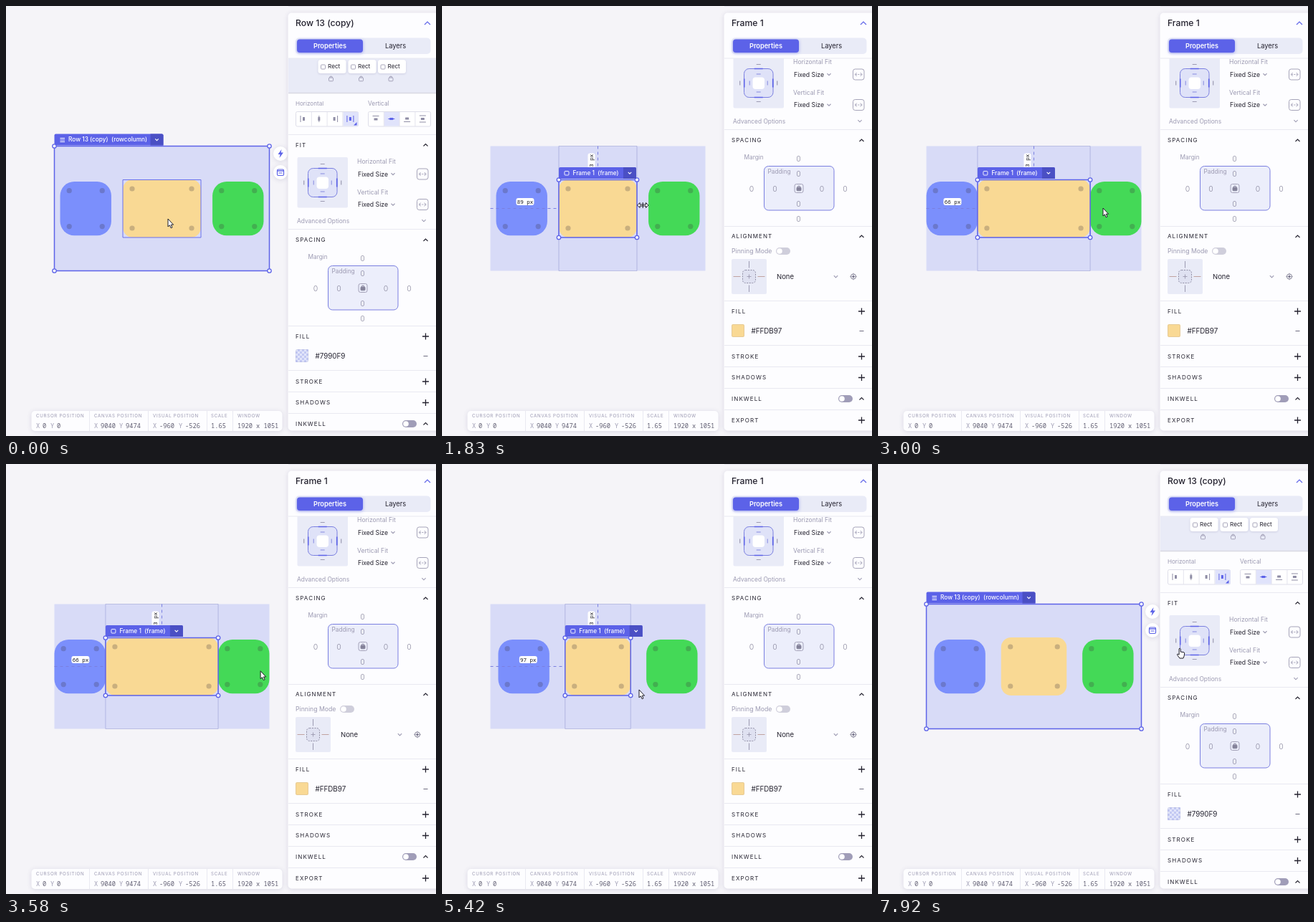
Animation of 600 by 600 pixels, one loop 8 s. Source, as an HTML page with a canvas:

```html
<!DOCTYPE html>
<html lang="en">
<head>
<meta charset="utf-8">
<title>Row layout editor</title>
<style>
html, body { margin: 0; width: 100%; height: 100%; overflow: hidden; background: #f5f4f8; }
canvas { display: block; width: 600px; height: 600px; }
</style>
</head>
<body>
<canvas id="stage" width="600" height="600"></canvas>
<script>
const ctx = document.getElementById('stage').getContext('2d');
const LOOP = 8000, STEP = 1000 / 12;
const SANS = 'Inter, "Open Sans", sans-serif', MONO = '"Noto Sans Mono", "DejaVu Sans Mono", monospace';
const ACCENT = '#5c62e8', SOFT = '#7a7fe0', INK = '#24222f', MUTED = '#9c9ab2', LINE = '#e9e9f1', PALE = '#e9ebf7';
const ROW = { x: 67.5, y: 195.5, w: 300, h: 174 };

const CURSOR = [
  [0, 226, 297], [250, 226, 297], [750, 263, 296], [917, 263, 296], [1170, 280, 278],
  [1833, 280, 278], [2500, 297, 281], [3000, 314, 282], [3333, 366, 290], [3500, 366, 290],
  [4250, 268, 279], [4500, 253, 283], [4667, 253, 283], [5417, 275, 315], [5583, 284, 322],
  [5750, 288.5, 326], [6000, 289, 345], [7333, 289, 345], [7917, 421, 257]
];
const WIDTH = [
  [1833, 109], [2500, 146], [2917, 157.2], [3917, 157.2], [4167, 142], [4250, 122.5],
  [4500, 82], [4667, 82], [5417, 91.5]
];

// Linear interpolation through [time, ...values] keys.
function track(keys, t) {
  const last = keys[keys.length - 1];
  if (t <= keys[0][0]) return keys[0].slice(1);
  if (t >= last[0]) return last.slice(1);
  const i = keys.findIndex(k => k[0] > t), a = keys[i - 1], b = keys[i];
  const u = (t - a[0]) / (b[0] - a[0]);
  return a.slice(1).map((v, j) => v + (b[j + 1] - v) * u);
}

function box(x, y, w, h, r, fill, stroke, lw = 1) {
  ctx.beginPath();
  ctx.roundRect(x, y, w, h, r);
  if (fill) { ctx.fillStyle = fill; ctx.fill(); }
  if (stroke) { ctx.strokeStyle = stroke; ctx.lineWidth = lw; ctx.stroke(); }
}
function dot(x, y, r, fill, stroke, lw = 1) {
  box(x - r, y - r, 2 * r, 2 * r, r, fill, stroke, lw);
}
function path(points, stroke, lw = 1, dash = []) {
  ctx.beginPath();
  for (let i = 0; i < points.length; i += 2) ctx.lineTo(points[i], points[i + 1]);
  ctx.strokeStyle = stroke;
  ctx.lineWidth = lw;
  ctx.setLineDash(dash);
  ctx.stroke();
  ctx.setLineDash([]);
}
function text(str, x, y, size, color = INK, { weight = 400, gap = 0, font = SANS, align = 'left' } = {}) {
  ctx.font = `${weight} ${size}px ${font}`;
  ctx.letterSpacing = gap + 'px';
  ctx.textAlign = align;
  ctx.fillStyle = color;
  ctx.fillText(str, x, y + size * 0.36);
}
function shadowed(draw, blur = 6, dy = 1, color = 'rgba(70,65,120,.16)') {
  ctx.save();
  ctx.shadowColor = color;
  ctx.shadowBlur = blur;
  ctx.shadowOffsetY = dy;
  draw();
  ctx.restore();
}
function chevron(x, y, dir, color = INK, s = 3) {
  path([x - s, y - dir * s / 2, x, y + dir * s / 2, x + s, y - dir * s / 2], color, 1.1);
}
function plus(x, y, s, color, lw) {
  path([x - s, y, x + s, y], color, lw);
  path([x, y - s, x, y + s], color, lw);
}
function lock(x, y, color, solid) {
  ctx.beginPath();
  ctx.arc(x, y - 1, 1.9, Math.PI, 0);
  ctx.strokeStyle = color;
  ctx.lineWidth = 1;
  ctx.stroke();
  box(x - 3, y - 1, 6, 4.8, 1, solid ? color : null, color, 0.9);
}
function toggle(x, y, color) {
  box(x, y - 5, 20, 10, 5, color);
  dot(x + 5, y, 3.8, '#fff');
}
function heading(str, y, mark) {
  text(str, 404, y, 8, INK, { gap: 1.1 });
  if (mark === '+') plus(585.5, y, 4.5, INK, 1.3);
  if (mark === '^') chevron(585.5, y, -1);
}
const rule = y => path([394, y + 0.5, 600, y + 0.5], LINE);

// --- canvas side -------------------------------------------------

function tile(x, y, w, h, r, inset, color) {
  box(x, y, w, h, r, color);
  for (const dx of [inset, w - inset])
    for (const dy of [inset, h - inset]) dot(x + dx, y + dy, 3.6, 'rgba(60,50,60,.25)');
}
function selection(x, y, w, h) {
  box(x, y, w, h, 0, null, ACCENT, 1.5);
  for (const cx of [x, x + w])
    for (const cy of [y, y + h]) dot(cx, cy, 2.7, '#fff', ACCENT, 1.3);
}
function tag(str, x, y, w) {
  box(x, y, w, 16, [2, 2, 0, 0], ACCENT);
  box(x + w - 18, y, 18, 16, [0, 2, 0, 0], '#4a4fc4');
  chevron(x + w - 9, y + 8, 1, '#fff', 2.3);
  text(str, x + 19.5, y + 8, 8.3, '#fff', { weight: 500 });
}
function pill(str, x, y, angle) {
  ctx.save();
  ctx.translate(x, y);
  ctx.rotate(angle);
  box(-12.5, -5, 25, 10, 3, '#fff');
  text(str, 0, 0, 7.5, '#17161f', { weight: 500, font: MONO, align: 'center' });
  ctx.restore();
}

function drawWorkspace(frameMode, w, hover) {
  const gap = (ROW.w - 142.8 - w) / 6;
  const blueX = ROW.x + gap, x = blueX + 71.4 + 2 * gap, greenX = x + w + 2 * gap;
  box(ROW.x, ROW.y, ROW.w, ROW.h, 0, '#d8dbf7');
  if (frameMode) box(x, ROW.y, w, ROW.h, 0, null, 'rgba(130,135,200,.55)', 0.8);
  tile(blueX, 245, 71.4, 75.3, 19.8, 12.7, '#7b8ffc');
  tile(greenX, 245, 71.4, 75.3, 19.8, 12.7, '#44d957');
  tile(x, 242, w, 81, 14, 13, '#f9d994');

  if (!frameMode) {
    if (hover) box(x, 242.5, w, 80.5, 0, null, '#6a70ea', 1);
    tag('Row 13 (copy)  (rowcolumn)', 67.5, 178.5, 152);
    for (const dy of [-2.5, 0, 2.5]) path([75.5, 187 + dy, 82, 187 + dy], '#fff', 1);
    selection(ROW.x, ROW.y, ROW.w, ROW.h);
    for (const cy of [206, 232]) shadowed(() => dot(383, cy, 10, '#fff'));
    ctx.beginPath();
    [[384.5, 200], [379.5, 207], [382.5, 207], [381.5, 212], [387, 204.5], [383.7, 204.5]]
      .forEach(p => ctx.lineTo(...p));
    ctx.fillStyle = ACCENT;
    ctx.fill();
    box(378.5, 228, 9, 8.5, 1.5, null, ACCENT, 1.2);
    path([378.5, 230, 387.5, 230], ACCENT, 1.4);
    path([380.5, 233, 385.5, 233], ACCENT);
    return;
  }
  path([ROW.x, 282.5, x, 282.5], SOFT, 1, [4, 4]);
  path([217.5, ROW.y, 217.5, 242], SOFT, 1, [4, 4]);
  const px = Math.round((x - ROW.x) * 0.93);
  pill(px + ' px', (ROW.x + x) / 2 + 0.7, 273, 0);
  pill('43 px', 208.5, 218, -Math.PI / 2);
  selection(x, 242.5, w, 80.5);
  tag('Frame 1  (frame)', x, 225, 108);
  box(x + 8, 230.5, 6, 5.5, 1, null, '#fff', 0.9);
}

function drawStatus() {
  shadowed(() => box(35.5, 565, 350, 28, 5, '#fdfdff'));
  for (const x of [116, 198, 280, 316]) path([x + 0.5, 565, x + 0.5, 593], LINE);
  const label = (str, x) => text(str, x, 571.5, 6.2, MUTED, { gap: 0.7 });
  const value = (str, x, color = '#5e5c70') => text(str, x, 585.5, 8.7, color, { font: MONO });
  [['CURSOR', 42, '0', '0', 20], ['CANVAS', 123, '9040', '9474', 35], ['VISUAL', 205, '-960', '-526', 36]]
    .forEach(([name, x, a, b, span]) => {
      label(name + ' POSITION', x);
      value('X', x, MUTED);
      value(a, x + 9);
      value('Y', x + span, MUTED);
      value(b, x + span + 9);
    });
  label('SCALE', 286);
  value('1.65', 286);
  label('WINDOW', 323);
  value('1920 x 1051', 323);
}

// --- properties panel --------------------------------------------

function drawFit(dy) {
  ctx.save();
  ctx.translate(0, dy);
  heading('FIT', 194, '^');
  box(406.5, 211, 70.5, 70.5, 2, PALE);
  box(421.5, 226.5, 40.5, 40, 7, '#dfe2f8', SOFT, 1);
  box(433.5, 238.5, 16.5, 16.5, 4, '#fff');
  for (const s of [-1, 1]) {
    const cx = 441.7, cy = 246.5;
    path([cx - 3, cy + s * 26, cx + 3, cy + s * 26], MUTED, 1.2);
    path([cx + s * 26, cy - 3, cx + s * 26, cy + 3], MUTED, 1.2);
    path([cx - 6, cy + s * 20, cx + 6, cy + s * 20], ACCENT, 1.6);
    path([cx + s * 20, cy - 6, cx + s * 20, cy + 6], ACCENT, 1.6);
    path([cx - 3, cy + s * 12.5, cx + 3, cy + s * 12.5], '#8589df', 1);
    path([cx + s * 12.5, cy - 3, cx + s * 12.5, cy + 3], '#8589df', 1);
  }
  [['Horizontal Fit', 217], ['Vertical Fit', 259.5]].forEach(([str, y]) => {
    text(str, 490, y, 8.6, MUTED);
    text('Fixed Size', 491, y + 17.5, 8.7);
    chevron(540, y + 17.5, 1, MUTED, 2.5);
    box(573.5, y + 10, 15.5, 15, 3, null, MUTED, 0.9);
    for (const s of [-1, 1]) {
      const tip = 581.2 + s * 5;
      path([tip - s * 2.5, y + 15, tip, y + 17.5, tip - s * 2.5, y + 20], MUTED, 0.9);
    }
    path([577, y + 17.5, 585.5, y + 17.5], MUTED, 0.9, [2, 1.3]);
  });
  text('Advanced Options', 406, 299.5, 8.4, MUTED);
  chevron(583, 299.5, 1, MUTED, 2.6);

  rule(311);
  heading('SPACING', 326.5, '^');
  text('Margin', 421.5, 350, 8.3, MUTED);
  box(449.5, 362.5, 97.5, 61.5, 6, '#eceefb', SOFT, 1);
  text('Padding', 454.5, 370.5, 8.3, MUTED);
  [[497.5, 352], [497.5, 436], [432, 394], [562.5, 394], [497.5, 373], [497.5, 415], [464.5, 394], [530, 394]]
    .forEach(([x, y]) => text('0', x, y, 10.5, '#8b899f', { weight: 300, align: 'center' }));
  box(492, 387.5, 12, 12, 2.5, null, MUTED, 0.9);
  lock(498, 393, '#85839a', true);
  rule(446);
  ctx.restore();
}

function drawChildren() {
  box(394, 73, 206, 48, 0, PALE);
  path([394, 121.5, 600, 121.5], '#d8d8e2', 1.4);
  for (const x of [435.5, 477.5, 519]) {
    shadowed(() => box(x, 75, 39, 19, 3.5, '#fff'), 3);
    box(x + 4, 82, 6, 6, 1.2, null, MUTED, 0.9);
    text('Rect', x + 13.5, 84.5, 8.2);
    lock(x + 18, 101, MUTED, false);
  }
}

function alignBar(x, active, vertical) {
  box(x + 0.5, 147.5, 87, 20.5, 2, '#fff', '#dedee9', 1);
  box(x + active * 21.8 + 1, 148, 21.3, 19.5, 0, '#e0e3fb');
  for (let i = 0; i < 4; i++) {
    if (i) path([x + i * 21.8 + 0.5, 148, x + i * 21.8 + 0.5, 168], '#e4e4ed');
    const color = i === active ? ACCENT : '#8f8da5';
    ctx.save();
    ctx.translate(x + i * 21.8 + 11, 157.5);
    if (vertical) ctx.rotate(Math.PI / 2);
    const edges = [[-4], [0], [4], [-4.5, 4.5]][i], shift = [0.5, 0, -0.5, 0][i];
    for (const e of edges) path([e, -4.5, e, 4.5], color, 1);
    box(shift - 1.5, -2.5, 3, 5, 0.5, color);
    ctx.restore();
  }
}

function drawAlign() {
  text('Horizontal', 404, 136, 8.1, MUTED);
  text('Vertical', 505, 136, 8.3, MUTED);
  alignBar(404, 3, false);
  alignBar(505, 1, true);
  ctx.beginPath();
  [[489.5, 162], [489.5, 166.5], [485, 166.5]].forEach(p => ctx.lineTo(...p));
  ctx.fillStyle = ACCENT;
  ctx.fill();
  rule(179);
}

function drawPinning() {
  heading('ALIGNMENT', 321.5, '^');
  text('Pinning Mode', 404, 342, 8.7, MUTED);
  toggle(466, 342, '#cfcedb');
  box(404, 353, 49, 49, 2, PALE);
  box(419.5, 368.5, 18, 18, 4, '#dfe1f1');
  ctx.setLineDash([2, 1.5]);
  box(419.5, 368.5, 18, 18, 4, null, '#85839b', 0.9);
  ctx.setLineDash([]);
  plus(428.5, 377.5, 3, MUTED, 0.9);
  for (const s of [-1, 1]) {
    path([428.5 + s * 12, 377.5, 428.5 + s * 22, 377.5], '#c0a29f', 1);
    path([428.5, 377.5 + s * 12, 428.5, 377.5 + s * 21.5], MUTED, 1);
  }
  text('None', 467, 377.5, 9.5);
  chevron(549.5, 377.5, 1, MUTED, 2.7);
  dot(574, 377.5, 3.6, null, '#77758b', 0.9);
  dot(574, 377.5, 1.6, '#77758b');
  plus(574, 377.5, 5, 'rgba(119,117,139,.6)', 0.8);
}

function drawPaint(y, frameMode) {
  heading('FILL', y, '+');
  const top = y + 18;
  box(404, top, 18, 18, 2, frameMode ? '#f9d994' : '#e2e5fa');
  if (!frameMode) {
    ctx.fillStyle = '#c3c9f3';
    for (let i = 0; i < 36; i++) {
      const col = i % 6, row = Math.floor(i / 6);
      if ((col + row) % 2) ctx.fillRect(404 + col * 3, top + row * 3, 3, 3);
    }
  }
  box(404.5, top + 0.5, 17, 17, 2, null, 'rgba(120,120,170,.15)');
  text(frameMode ? '#FFDB97' : '#7990F9', 431.5, y + 27, 9.8);
  path([582.5, y + 27.5, 588.5, y + 27.5], '#6d6b80', 1.1);
  rule(y + 47);
  heading('STROKE', y + 63, '+');
  rule(y + 77);
  heading('SHADOWS', y + 92.5, '+');
  rule(y + 107);
  heading('INKWELL', y + 122, '^');
  toggle(553, y + 122, '#a09db8');
  rule(y + 137);
  heading('EXPORT', y + 152, '+');
}

function drawPanel(frameMode) {
  path([394, 0, 600, 0], '#e4e4ec', 2);
  shadowed(() => box(393.5, 9.5, 220, 583, [5, 0, 0, 5], '#fdfdff'));
  ctx.save();
  ctx.beginPath();
  ctx.rect(393.5, 73, 206.5, 519);
  ctx.clip();
  if (frameMode) {
    drawFit(-139);
    drawPinning();
    rule(411);
    drawPaint(426, true);
  } else {
    drawChildren();
    drawAlign();
    drawFit(0);
    drawPaint(461, false);
  }
  ctx.restore();
  path([394, 73, 600, 73], LINE);
  text(frameMode ? 'Frame 1' : 'Row 13 (copy)', 404, 23.5, 12.2, INK, { weight: 500 });
  chevron(588, 24, -1, ACCENT, 4);
  box(404, 44.5, 188.5, 22.5, 5, PALE);
  shadowed(() => box(406, 46.5, 92, 18.5, 4, ACCENT), 4, 1, 'rgba(92,98,232,.5)');
  text('Properties', 452, 56, 9.2, '#fff', { weight: 600, align: 'center' });
  text('Layers', 543.5, 56, 9.3, INK, { align: 'center' });
}

// --- pointer -----------------------------------------------------

function outline(points) {
  ctx.beginPath();
  for (let i = 0; i < points.length; i += 2) ctx.lineTo(points[i], points[i + 1]);
  ctx.closePath();
  ctx.lineJoin = 'round';
  ctx.fillStyle = '#fff';
  ctx.fill();
  ctx.strokeStyle = '#1d1c26';
  ctx.lineWidth = 1;
  ctx.stroke();
  ctx.lineJoin = 'miter';
}
function drawPointer(x, y, kind) {
  ctx.save();
  ctx.translate(x, y);
  if (kind === 'arrow') {
    outline([0, 0, 0, 11, 2.4, 8.8, 4.2, 12.8, 6, 12, 4.3, 8.2, 7.6, 8.2]);
  } else if (kind === 'resize') {
    outline([-7.5, 0, -4, -3.5, -4, -1, 4.5, -1, 4.5, -3.5, 8, 0, 4.5, 3.5, 4.5, 1, -4, 1, -4, 3.5]);
    path([0.2, -4, 0.2, 4], '#1d1c26', 1);
  } else {
    outline([-0.8, 0.8, 0.2, 0, 1.2, 0.8, 1.3, 5, 6, 5.7, 6.8, 7, 6.2, 11, 5, 14, 0, 14, -3.4, 9.3, -3, 8, -0.8, 9]);
  }
  ctx.restore();
}

function render(t) {
  const frameMode = t >= 330 && t < 6495;
  const [x, y] = track(CURSOR, t);
  ctx.fillStyle = '#f5f4f8';
  ctx.fillRect(0, 0, 600, 600);
  drawWorkspace(frameMode, track(WIDTH, t)[0], t < 330);
  drawStatus();
  drawPanel(frameMode);
  const resizing = t > 1080 && t < 2080;
  drawPointer(x, y, resizing ? 'resize' : x > 407 ? 'hand' : 'arrow');
}

const start = performance.now();
function tick() {
  const t = (performance.now() - start) % LOOP;
  render(Math.floor((t + 4) / STEP) * STEP % LOOP);
  requestAnimationFrame(tick);
}
tick();
</script>
</body>
</html>
```
